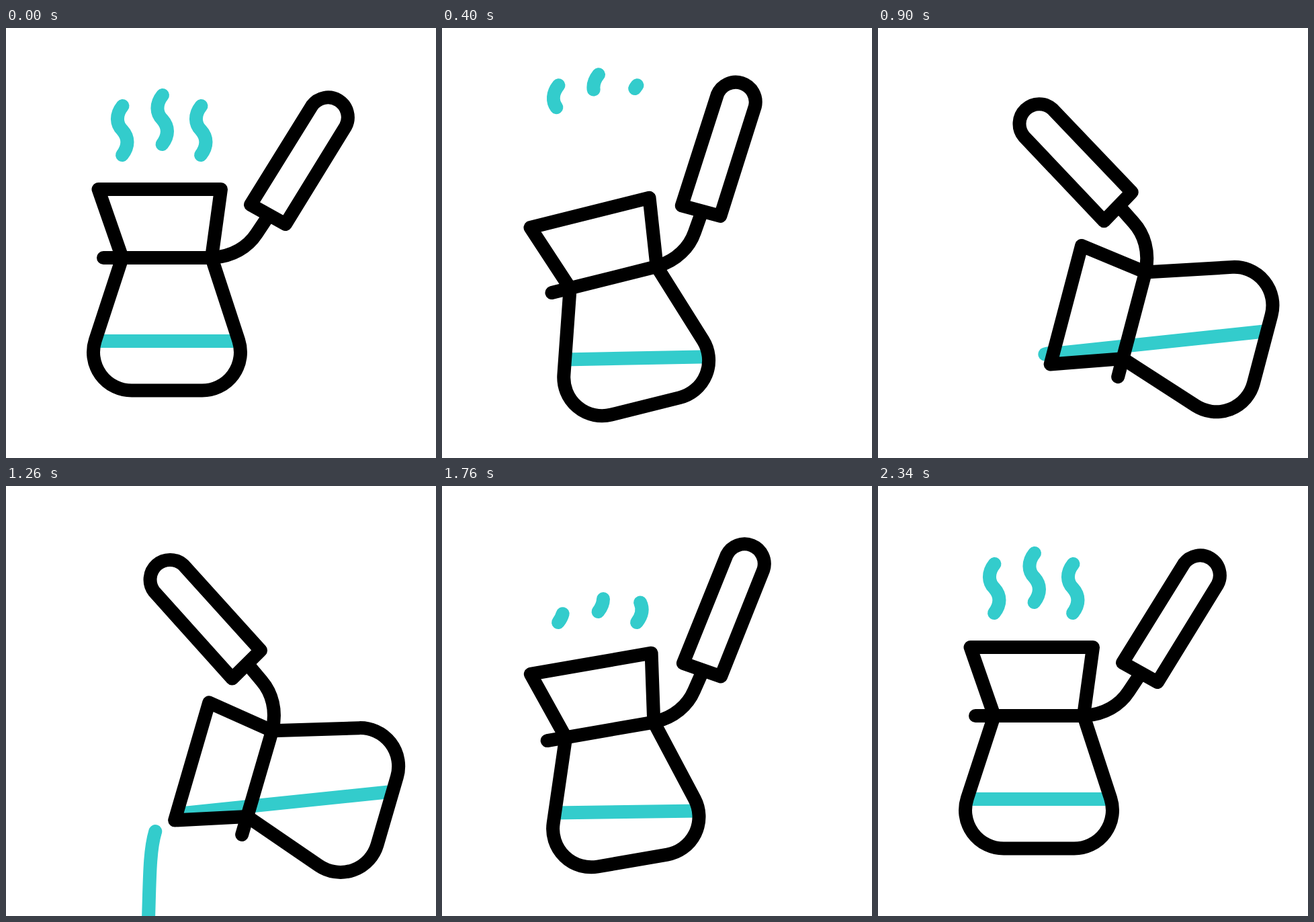
An HTML page for the animation above (2400 ms loop, 640x640 px).

```html
<!DOCTYPE html>
<html lang="en">
<head>
<meta charset="utf-8">
<title>Coffee pot</title>
<style>
  html, body { margin: 0; width: 100%; height: 100%; overflow: hidden; background: #fff; }
  svg { display: block; width: 100vw; height: 100vh; }
  path { fill: none; stroke-width: 20; stroke-linecap: round; stroke-linejoin: round; }
  .ink path { stroke: #000; }
  .aqua { stroke: #33cccc; }
</style>
</head>
<body>
<svg viewBox="0 0 640 640">
  <defs>
    <clipPath id="inside">
      <path d="M137 240H320L306 342L346.2 464.9A57 57 0 0 1 292 539.5H187A57 57 0 0 1 132.8 464.9L173 342Z"/>
    </clipPath>
  </defs>
  <g id="steam"></g>
  <path id="stream" class="aqua" pathLength="100" d="M256 484C238 486 227 499 222 515C213 545 214 590 211.5 660"/>
  <g id="pot">
    <g clip-path="url(#inside)">
      <path id="level" class="aqua" d="M-60 466H546"/>
    </g>
    <g class="ink">
      <path d="M173 342L137.5 240H320L306 342"/>
      <path d="M145 342H306"/>
      <path d="M173 342L132.8 464.9A57 57 0 0 0 187 539.5H292A57 57 0 0 0 346.2 464.9L306 342"/>
      <path d="M308 341.7C337 340 360 326 373 306L389 282"/>
      <path d="M364 263L416 292L505.5 146.5A29.5 29.5 0 0 0 455.5 115.5Z"/>
    </g>
  </g>
</svg>
<script>
const LOOP = 2400;
const TURN = 1038;  // moment of the steepest tilt
const $ = id => document.getElementById(id);
const clamp = x => Math.min(1, Math.max(0, x));
const smooth = x => x * x * (3 - 2 * x);

// Same curve as cubic-bezier(a, 0, 1 - a, 1)
function strong(x, a = 0.75) {
  let lo = 0, hi = 1;
  for (let i = 0; i < 30; i++) {
    const s = (lo + hi) / 2, r = 1 - s;
    if (3 * a * s * r * r + 3 * (1 - a) * s * s * r + s * s * s < x) lo = s;
    else hi = s;
  }
  return smooth(lo);
}

const span = (t, from, to, ease = smooth) => ease(clamp((t - from) / (to - from)));

// Shows only the part of a path between two percentages
function trim(path, from, to) {
  const len = to - from;
  path.style.display = len < 0.05 ? 'none' : '';
  path.setAttribute('stroke-dasharray', `${len} 200`);
  path.setAttribute('stroke-dashoffset', -from);
}

const wisps = [
  { x: 0, y: 0, gone: 745, full: 2355 },
  { x: 59.5, y: -16, gone: 630, full: 2205 },
  { x: 117, y: 0, gone: 480, full: 2055 }
];
for (const w of wisps) {
  w.el = document.createElementNS('http://www.w3.org/2000/svg', 'path');
  w.el.setAttribute('class', 'aqua');
  w.el.setAttribute('pathLength', 100);
  w.el.setAttribute('d', 'M173.5 116C163 129 164 143 173 152C183 163 183 176 173 189');
  w.el.setAttribute('transform', `translate(${w.x} ${w.y})`);
  $('steam').append(w.el);
}

function draw(t) {
  const tilt = t < TURN ? span(t, 0, TURN, strong) : 1 - span(t, TURN, 2142, strong);
  $('pot').setAttribute('transform', `rotate(${-76.2 * tilt} 366 293)`);
  $('level').setAttribute('transform', `rotate(${70.1 * tilt} 239.5 466)`);

  const rising = t < 1100;
  const lift = rising ? -39 * span(t, 0, 570) : 39 * (1 - span(t, 1425, 1990));
  $('steam').setAttribute('transform', `translate(0 ${lift})`);
  for (const w of wisps) {
    if (rising) trim(w.el, 0, 100 * (1 - span(t, 0, w.gone)));
    else trim(w.el, 100 * (1 - span(t, 1540, w.full)), 100);
  }

  trim($('stream'), 100 * span(t, 1151, 1491), 100 * span(t, 860, 1200));
}

const start = performance.now();
function tick() {
  draw((performance.now() - start) % LOOP);
  requestAnimationFrame(tick);
}
tick();
</script>
</body>
</html>
```
